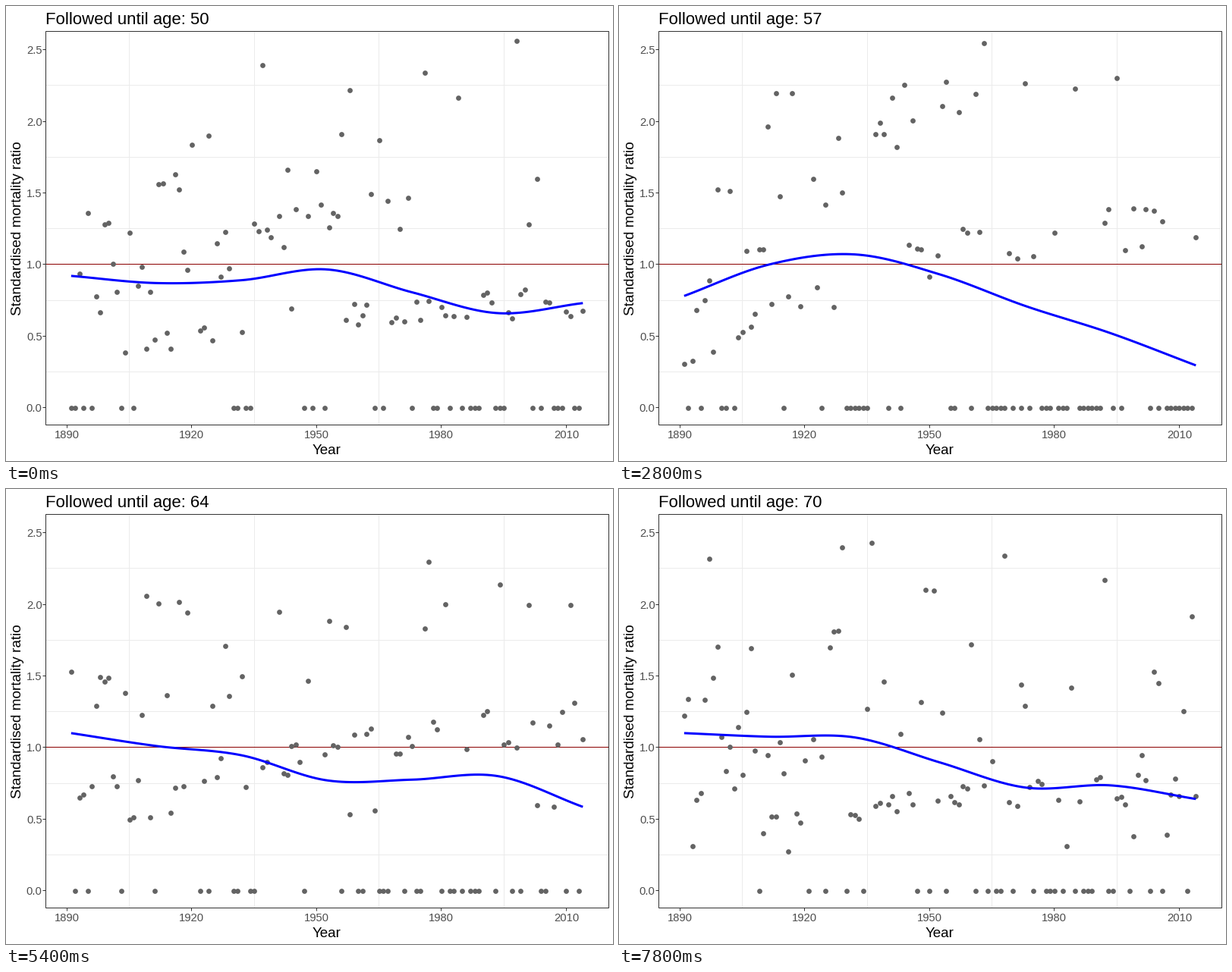
These frames come from a looping animation (800x600 px, 8 s). A matplotlib script:

```python
import matplotlib.pyplot as plt
import numpy as np
from matplotlib.animation import FuncAnimation

W, H, DPI = 800, 600, 100
PX = 72 / DPI                      # points per pixel
FRAMES, INTERVAL = 40, 200
LEFT, RIGHT, TOP, BOTTOM = 52.5, 794.5, 33.5, 552.5
FIRST_AGE, LAST_AGE, MAX_RATIO = 50, 70, 2.58
INK, GRID, TICK_TEXT = "#333333", "#ebebeb", "#4d4d4d"

plt.rcParams["font.family"] = "Liberation Sans"
years = np.arange(1891, 2015)

# Smoothed ratio at evenly spaced years, for a few ages
TREND = {
    50: (.92, .87, .89, .965, .805, .66, .73),
    57: (.78, 1.0, 1.07, .93, .71, .52, .295),
    60: (1.01, 1.02, .965, .885, .91, .75, .39),
    63.5: (1.1, 1.01, .945, .77, .775, .8, .585),
    69.5: (1.1, 1.075, 1.07, .895, .72, .735, .64),
}


def px(year):
    return 80.4 + 5.483 * (year - 1890)


def py(ratio):
    return 529.6 - 188.8 * ratio


def center(v):
    """Middle of the pixel that holds v, for crisp lines."""
    return np.floor(v) + .5


def smooth(knots):
    """Cubic Hermite curve through evenly spaced knots, one value a year."""
    slope = np.gradient(knots)
    s = np.linspace(0, len(knots) - 1, len(years))
    i = np.minimum(s.astype(int), len(knots) - 2)
    t = s - i
    return ((1 + 2 * t) * (1 - t) ** 2 * knots[i] + t * (1 - t) ** 2 * slope[i]
            + t * t * (3 - 2 * t) * knots[i + 1] + t * t * (t - 1) * slope[i + 1])


def trend_at(age):
    return smooth(np.array([np.interp(age, list(TREND), col)
                            for col in zip(*TREND.values())]))


def unit(age):
    """Ratio one death stands for: grows with the year, peaks near age 60."""
    rise = 1 - ((2014 - years) / 123) ** 2
    return .33 + rise * (.35 + .75 * np.exp(-((age - 59.5) / 6) ** 2))


def simulate():
    """Ratios by age: Poisson deaths around the trend, partly redrawn each year."""
    rng = np.random.default_rng(12)
    spread = rng.uniform(.85, 1.15, len(years))
    deaths, rows = None, []
    for age in range(FIRST_AGE, LAST_AGE + 1):
        u = unit(age)
        fresh = rng.poisson(trend_at(age) / u)
        keep = rng.random(len(years)) > .22
        deaths = fresh if deaths is None else np.where(keep, deaths, fresh)
        row = deaths * u * spread
        rows.append(np.where(row > MAX_RATIO, np.nan, row))
    return np.array(rows)


ratios = simulate()

fig = plt.figure(figsize=(W / DPI, H / DPI), dpi=DPI, facecolor="white")
ax = fig.add_axes([0, 0, 1, 1])
ax.set_xlim(0, W)
ax.set_ylim(H, 0)
ax.axis("off")


def line(xs, ys, color, width=1, z=1):
    return ax.plot(xs, ys, color=color, lw=width * PX, zorder=z, snap=False,
                   solid_capstyle="butt", solid_joinstyle="miter")[0]


def label(x, y, text, size, color="black", **kw):
    return ax.text(x, y, text, fontsize=size * PX, color=color, **kw)


for year in range(1890, 2020, 30):
    x = center(px(year))
    line([x, x], [BOTTOM, BOTTOM + 4], INK)
    label(x, 570, str(year), 14.7, TICK_TEXT, ha="center")
for year in range(1905, 2000, 30):
    x = center(px(year))
    line([x, x], [TOP, BOTTOM], GRID)
for ratio in np.arange(0, 3, .5):
    y = center(py(ratio))
    line([LEFT - 4, LEFT], [y, y], INK)
    label(47.5, y + 5.5, f"{ratio:.1f}", 14.7, TICK_TEXT, ha="right")
for ratio in np.arange(.25, 2.5, .5):
    y = center(py(ratio))
    line([LEFT, RIGHT], [y, y], GRID)

line([LEFT, RIGHT], [center(py(1))] * 2, "#8b0000", z=2)
ax.add_patch(plt.Rectangle((LEFT, TOP), RIGHT - LEFT, BOTTOM - TOP, fill=False,
                           ec=INK, lw=PX, zorder=6, snap=False))
label(422.5, 591, "Year", 18.8, ha="center")
label(24.5, 293, "Standardised mortality ratio", 19, rotation=90,
      ha="right", va="center")

title = label(52, 24, "", 22.1)
dots, = ax.plot([], [], "o", ms=6.8 * PX, mfc="#636363", mec="none", zorder=3)
curve = line([], [], "#0000ff", 3, 4)


def draw(step):
    title.set_text(f"Followed until age: {round(FIRST_AGE + step * 50 / 99)}")
    i, half = divmod(step, 2)
    values = (ratios[i] + ratios[i + 1]) / 2 if half else ratios[i]
    dots.set_data(px(years), py(values))
    curve.set_data(px(years), py(trend_at(FIRST_AGE + step / 2)))
    return title, dots, curve


anim = FuncAnimation(fig, draw, frames=FRAMES, interval=INTERVAL,
                     init_func=lambda: draw(0), repeat=True, repeat_delay=0)
plt.show()
```
